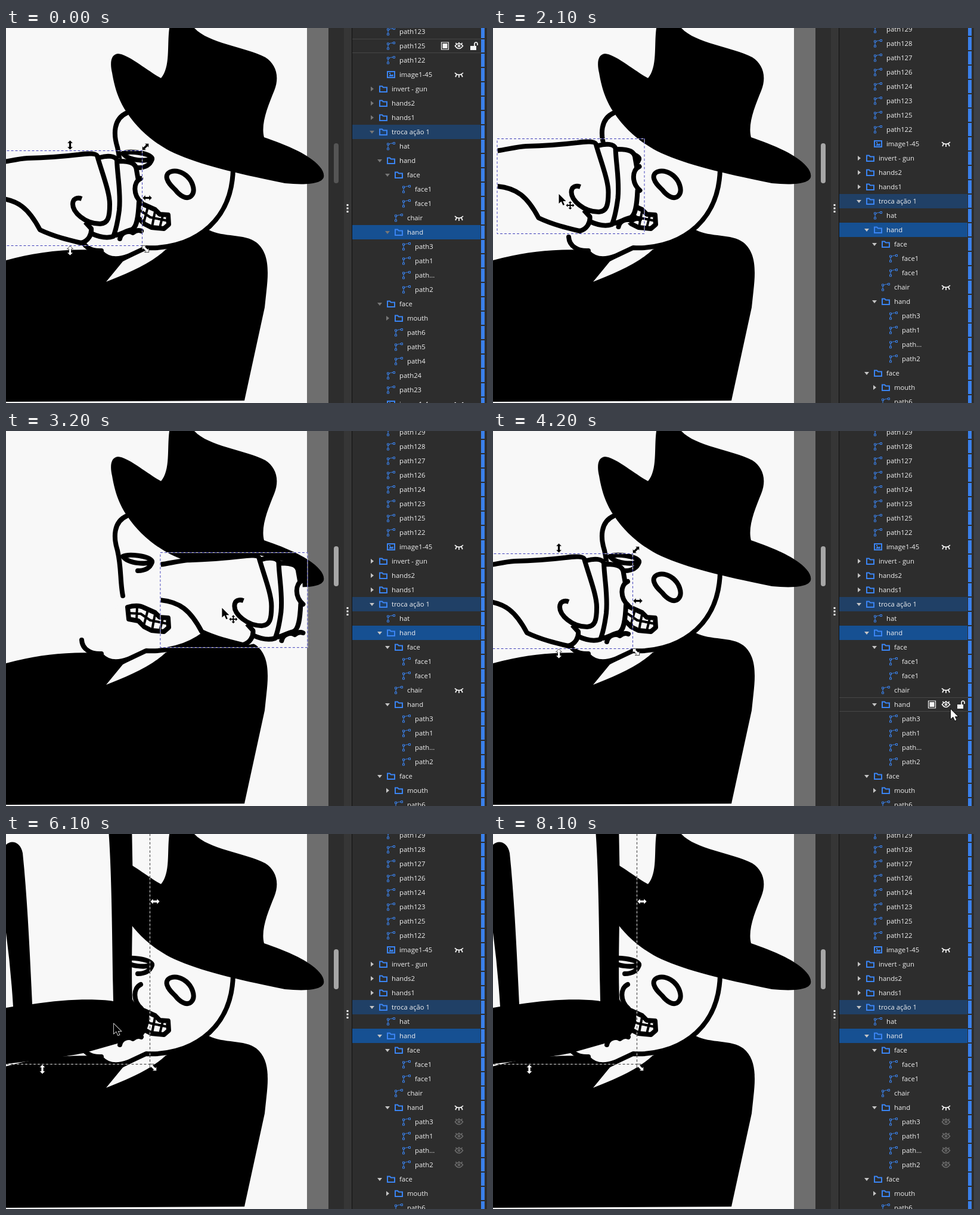
Animation, 807 px wide and 628 px high, one loop 9000 ms. Source, as an HTML page:

```html
<!DOCTYPE html>
<html lang="en">
<head>
<meta charset="utf-8">
<title>Layers panel drag</title>
<style>
html, body { margin: 0; width: 100%; height: 100%; overflow: hidden; background: #f8f8f8 }
svg { display: block }
text { font: 11.3px "Open Sans", "Noto Sans", sans-serif; fill: #f0f0f0 }
.line { fill: none; stroke: #000; stroke-width: 8; stroke-linecap: round; stroke-linejoin: round }
.skin { fill: #f8f8f8 }
.thin { stroke-width: 4 }
.blue { fill: none; stroke: #3a84f2 }
.icon { fill: none; stroke: #f4f4f4; stroke-width: 1.7 }
#cursor path { paint-order: stroke; stroke-width: 1.5 }
</style>
</head>
<body>
<svg width="807" height="628" viewBox="0 0 807 628">
  <rect width="807" height="628" fill="#f8f8f8"/>
  <rect x="505" width="36" height="628" fill="#6e6e6e"/>

  <!-- coat, collar, head -->
  <path d="M0 389C45 377 95 369 158 372L268 371L340 338C365 351 400 344 420 359C441 376 441 405 437 440L434 468L400 624L0 626Z"/>
  <path class="skin" d="M268 371C240 397 200 412 168 425L196 391L235 371Z"/>
  <path class="skin" d="M203 142C180 150 180 178 187 200C194 230 190 255 196 280C175 315 150 320 127 350C128 366 143 374 160 373C170 388 190 388 205 382L235 368C300 372 379 335 381 240Z"/>
  <path class="line" d="M203 142C180 152 180 178 187 200C194 230 191 250 196 276M127 350C128 366 143 374 160 373M160 376C172 389 189 388 205 382L235 368C300 372 379 335 381 236"/>

  <!-- eyes and teeth -->
  <g class="line">
    <path d="M196 210C206 205 240 209 245 218C238 224 206 223 196 210ZM245 220Q240 234 221 234"/>
    <path d="M270 252C267 241 282 235 298 244C313 253 319 273 311 281C303 289 291 280 284 271C278 265 272 260 270 252Z"/>
    <path class="skin" d="M204 295Q222 290 232 296L250 304L258 312L272 313L273 329L265 336L244 334L232 328L222 318L206 315Z"/>
    <path class="thin" d="M206 305L226 306L242 317L272 323M220 294L219 316M238 300L231 326M250 307L245 333M263 314L258 334"/>
  </g>

  <!-- hat -->
  <path d="M274 0C270 30 276 65 260 84C235 70 205 44 188 43C176 44 174 58 178 75C183 105 191 124 203 142C222 170 245 190 275 206C320 228 380 242 468 260C500 263 529 262 533 250C536 236 515 219 490 206C470 196 450 189 433 183C427 160 440 130 450 105C460 80 452 60 435 49C400 31 340 26 316 0Z"/>

  <g id="group">
    <g id="fist" class="line">
      <path class="skin" stroke="none" d="M-12 225L36 217L81 216L151 209L183 217L212 224L221 240L223 293L213 338L180 351L130 361L57 338C40 305 20 292 -12 286Z"/>
      <path stroke-linecap="butt" d="M-12 225.500C5 223 20 219 36 218Q80 217 122 212Q150 208 153 214C162 245 174 275 174 295C174 318 171 327 158 328C132 328 112 308 112 295C112 286 119 283 127 286M-12 285C20 288 38 302 57 338C80 349 105 355 126 360C138 357 144 346 143 336L133 325"/>
      <path d="M157 217C170 213 183 214 186 221C187 250 193 275 190 305Q186 335 180 349Q165 354 143 344M190 223C210 223 218 227 219 238L222 255M223 292C222 315 220 335 210 338C200 340 195 345 184 347"/>
    </g>
    <path id="chair" d="M-119 -159V300L-20 400L0 385C60 378 100 373 130 367L190 350L228 340C237 330 242 315 240 302C232 294 222 294 212 277C210 230 212 150 213 90L211 -20H171C178 60 178 190 180 280C150 275 95 277 44 285C40 200 36 110 28 32C24 10 4 9 -3 22C-8 60 -3 120 0 165Q8 225 12 289L-119 310Z"/>
    <path class="line skin" d="M226 252C213 258 213 280 227 292M191 353C193 343 205 338 213 343Q220 337 227 340"/>
  </g>
  <g id="marks"></g>

  <rect x="541" width="266" height="628" fill="#2d2d2d"/>
  <rect x="567" width="13" height="628" fill="#363636"/>
  <rect x="580" width="1" height="628" fill="#111"/>
  <rect id="scroll" x="550" y="193" width="8" height="67" rx="4"/>
  <path d="M573 295v14" stroke="#eee" stroke-width="3" stroke-dasharray="3 2.500"/>
  <g id="panel"></g>
  <g id="cursor">
    <path id="arrow" d="M0 0V16L4 12.500L7 19L9.500 18L6.800 12H12Z"/>
    <path id="cross" transform="translate(19 19)" stroke="#fff" d="M0-7L3-4H1V-1H4V-3L7 0L4 3V1H1V4H3L0 7L-3 4H-1V1H-4V3L-7 0L-4-3V-1H-1V-4H-3Z"/>
  </g>
</svg>
<script>
const $ = id => document.getElementById(id);
const LOOP = 9000, STEP = 100, ROW = 24;
const SELECT = 1500, GRAB = 1700, UNDO = 3500, HIDE = 4900, SHOW = 5300, REGRAB = 6200, DROP = 7400, RESET = 8100;

// level, kind (p path, i image, c closed folder, o open folder), name
const rows = `1p path129,1p path128,1p path127,1p path126,1p path124,1p path123,1p path125,1p path122,1i image1-45,
0c invert - gun,0c hands2,0c hands1,0o troca ação 1,1p hat,1o hand,2o face,3p face1,3p face1,2p chair,2o hand,
3p path3,3p path1,3p path...,3p path2,1o face,2c mouth,2p path6,2p path5,2p path4,1p path24,1p path23,1i image1-4`
  .split(/,\s*/).map(s => ({ level: +s[0], kind: s[1], name: s.slice(3) }));
const TOP = 12, GROUP = 14, CHAIR = 18, FIST = 19;

// eased 0..1 between two times
function ramp(t, from, to) {
  const u = Math.min(1, Math.max(0, (t - from) / (to - from)));
  return u * u * (3 - 2 * u);
}

function dragAt(t) {
  if (t < UNDO) {
    const nudge = ramp(t, GRAB, 2500), fling = ramp(t, 2700, 3300);
    return [39 * nudge + 251 * fling, 24 * Math.sin(Math.PI * fling) - 20 * Math.sin(Math.PI * nudge) - 8 * fling];
  }
  return t < RESET ? [60 * ramp(t, 6700, 7000) - 48 * ramp(t, REGRAB, 6500), 0] : [0, 0];
}

// pointer moves: from, to, x, y
const moves = [
  [0, 300, 368, 263], [400, 900, 117, 298], [1000, 1100, 90, 298], [1300, SELECT, 91, 282],
  [SELECT, 1600, 91, 298], [3400, UNDO, 381, 290], [UNDO, 4200, 768, 466], [4300, 4700, 756, 459],
  [HIDE, 5100, 756, 436], [5700, 6100, 181, 318], [7300, 7800, 830, 150]
];
function pointerAt(t, [dx, dy]) {
  let x = 808, y = 30;
  for (const [from, to, tx, ty] of moves) {
    const u = ramp(t, from, to);
    x += (tx - x) * u;
    y += (ty - y) * u;
  }
  return [x + dx, y + dy];
}

const put = (x, y, body, attrs = '') => `<g transform="translate(${x} ${y})" ${attrs}>${body}</g>`;
const band = (y, color) => `<rect x="581" y="${y - 12}" width="215" height="24" fill="${color}"/>`;

const folder = '<path class="blue" stroke-width="2" d="M-6-4.500H-2L0-2.500H6V5H-6Z"/>';
const icons = {
  c: folder, o: folder,
  p: '<path class="blue" d="M-5 3V0C-5-3-2-5 3-5M-6.500 3h3v3h-3zM3.500-6.500h3v3h-3zM-6.500-5h3v3h-3z"/>',
  i: '<path class="blue" stroke-width="2" d="M-6-5H6V5H-6Z"/><path fill="#3a84f2" d="M-4 3L-1-1L1 1L3-1L4 3ZM-3-3h2v2h-2z"/>'
};
const openEye = '<path class="icon" d="M-6.500 0Q0-8 6.500 0Q0 9-6.500 0ZM0-4V-6M-4-3L-5.500-5M4-3L5.500-5"/><circle class="icon" r="1.500"/>';
const shutEye = '<path class="icon" d="M-7-3Q0 4 7-3M-4 0L-6 4M0 1V5M4 0L6 4"/>';
const box = '<path class="icon" style="stroke-width:1.200" d="M-6-6H6V6H-6Z"/><path fill="#f4f4f4" d="M-4-4H4V4H-4Z"/>';
const lock = '<path fill="#f4f4f4" d="M-6 0H4V7H-6Z"/><path class="icon" d="M1 0V-3Q1-6 3.500-6T6-3V-1"/>';

function drawPanel(t, [cx, cy]) {
  const late = t >= SELECT, top = late ? 2 : -114;
  const selected = late ? GROUP : FIST, hidden = t >= HIDE;
  const hover = cx > 581 && cx < 810 ? Math.round((cy - top) / ROW) : -1;
  $('panel').innerHTML = rows.map(({ level, kind, name }, i) => {
    const y = top + i * ROW, x = 633 + 13 * level;
    const shut = kind === 'i' || i === CHAIR && t < SHOW || i === FIST && hidden;
    let s = i === TOP ? band(y, '#204066') : i === selected ? band(y, '#165092') : '';
    s += `<rect x="797" y="${y - 11}" width="6" height="22" fill="#3a80ea"/>`;
    if (kind === 'c' || kind === 'o')
      s += put(x - 19, y, `<path d="${kind === 'c' ? 'M-2-4L3 0L-2 4Z' : 'M-4-2H4L0 3Z'}"/>`, `fill="${late ? '#c4c4c4' : '#777'}"`);
    s += put(x, y, icons[kind]) + `<text x="${x + 14}" y="${y + 4}">${name}</text>`;
    if (i === hover)
      s += `<path d="M581 ${y - 11.5}H797M581 ${y + 11.5}H797" stroke="#474747"/>` + put(736.5, y, box) + put(785, y, lock);
    if (shut) s += put(760, y, shutEye);
    else if (i === hover) s += put(760, y, openEye);
    else if (hidden && i > FIST && level === 3) s += put(760, y, openEye, 'opacity=".3"');
    return s;
  }).join('');
}

function drawMarks(t, [dx, dy], moving) {
  const chair = t >= SHOW;
  const [l, u, r, b] = chair ? [-119, -159, 241, 385] : t >= HIDE ? [187, 248, 232, 357] : [-13, 205, t < 1600 ? 228 : 234, 364];
  const frame = `<rect fill="none" x="${l + .5}" y="${u + .5}" width="${r - l}" height="${b - u}"`;
  let s = `${frame} stroke="#fff"/>${frame} stroke="${chair && !moving ? '#333' : '#4040b8'}" stroke-dasharray="4 3"/>`;
  for (let i = -1; i < 2 && !moving; i++) for (let j = -1; j < 2; j++) {
    if (!i && !j) continue;
    const gap = i && j ? 6 : 9, light = chair || j > 0;
    const x = (l + r) / 2 + i * ((r - l) / 2 + gap), y = (u + b) / 2 + j * ((b - u) / 2 + gap);
    const turn = i && j ? 45 * i * j : 90 * Math.abs(j);
    s += `<path transform="translate(${x} ${y}) rotate(${turn})" fill="${light ? '#fff' : '#000'}" stroke="${light ? '#000' : '#fff'}" stroke-width=".7" d="M-8 0L-3-5V-2H3V-5L8 0L3 5V2H-3V5Z"/>`;
  }
  $('marks').innerHTML = put(dx, dy, s);
}

function draw(t) {
  const d = dragAt(t), c = pointerAt(t, d);
  const moving = t > GRAB && t < UNDO || t > REGRAB && t < DROP;
  $('group').setAttribute('transform', `translate(${d})`);
  $('fist').style.display = t < HIDE ? '' : 'none';
  $('chair').style.display = t < SHOW ? 'none' : '';
  $('scroll').setAttribute('fill', t < 200 ? '#555' : '#a6a6a6');
  drawMarks(t, d, moving);
  drawPanel(t, c);
  const onPanel = c[0] > 541;
  $('cursor').setAttribute('transform', `translate(${c})`);
  $('arrow').setAttribute('fill', onPanel ? '#fff' : '#000');
  $('arrow').setAttribute('stroke', onPanel ? '#000' : '#fff');
  $('cross').style.display = moving || t >= 900 && t < UNDO ? '' : 'none';
}

let last = -1;
const start = performance.now();
function tick() {
  const t = Math.floor((performance.now() - start) % LOOP / STEP) * STEP;
  if (t !== last) draw(last = t);
  requestAnimationFrame(tick);
}
tick();
</script>
</body>
</html>
```
